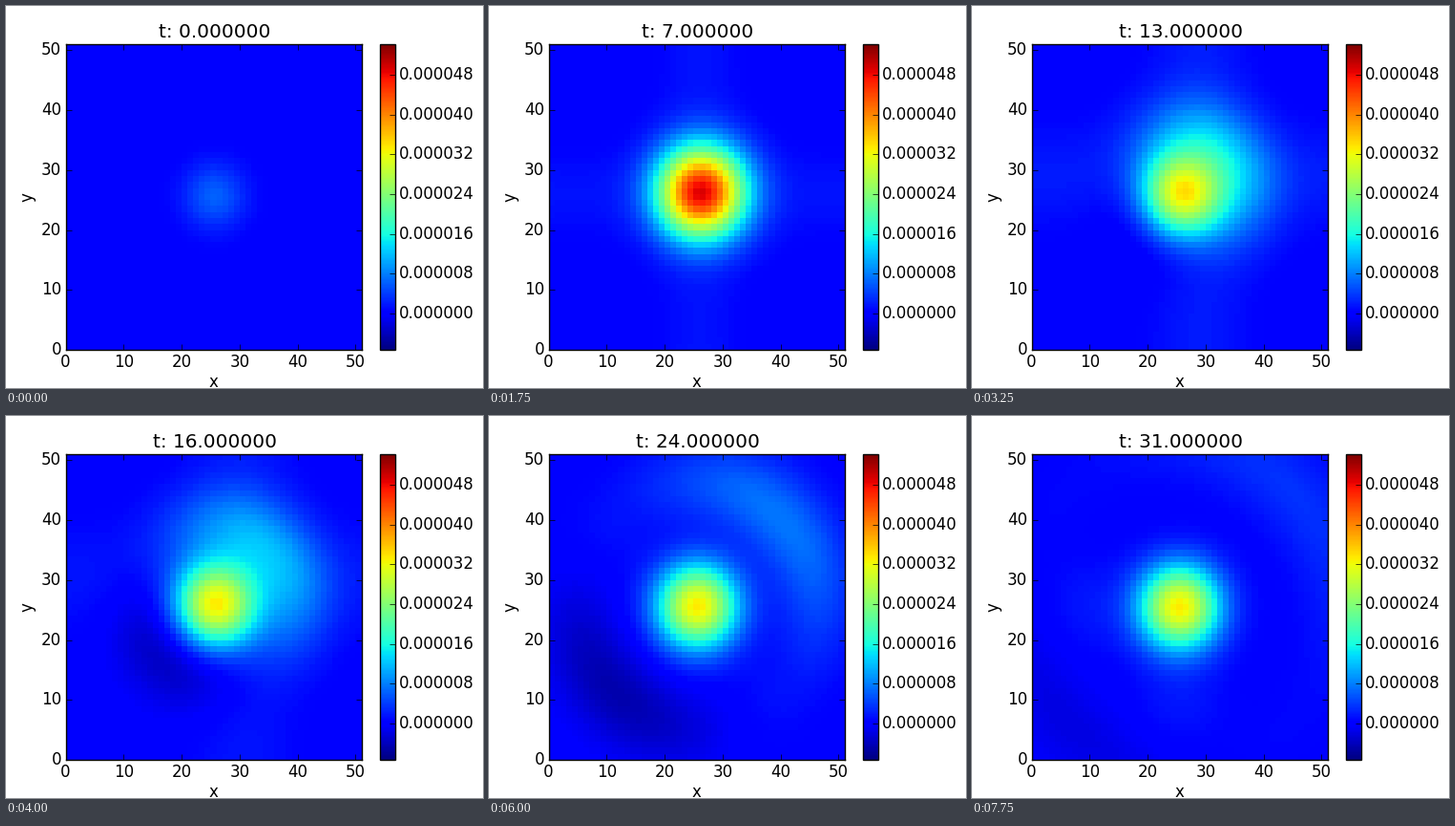
Write a matplotlib script that moves like this. It is 500 px wide and 400 px high and loops after 8 s.

```python
import numpy as np
import matplotlib.pyplot as plt
from matplotlib.animation import FuncAnimation

plt.style.use("classic")
plt.rcParams.update({
    "font.family": "DejaVu Sans",
    "xtick.major.pad": 3.2,
    "ytick.major.pad": 3.2,
})

CELLS = 51
STEPS = 32
VMIN, VMAX = -7.3e-6, 54.14e-6

axis = np.arange(CELLS) + 0.5 - CELLS / 2
X, Y = np.meshgrid(axis, axis)


def bell(d, width):
    return np.exp(-d**2 / (2 * width**2))


def spot(x, y, width):
    return bell(np.hypot(X - x, Y - y), width)


def core(t, rise):
    """Standing peak that builds up and leans along the diagonal for a while."""
    s = 0.5 * bell(t - 12, 8)
    return (6.2 + 27.1 * rise) * spot(s, s, 3.8 + 1.1 * rise)


def wave(t, rise):
    """Ring running outwards, raised to the upper right, lowered opposite."""
    s = bell(t - 13, 7)
    r = np.hypot(X - s, Y - s)
    lean = np.cos(np.arctan2(Y - s, X - s) - np.pi / 4)
    lean *= np.abs(lean) ** max(t / 16 - 1, 0)   # narrows as it travels

    front = np.logaddexp(0, t - 3.7)
    out, back = bell(r - front, 5), bell(r + front, 5)
    even = 12.7 * rise / (1 + (front / 6.5)**2)
    odd = 7.5 * bell(t - 18, 9)
    return even * (out + back) + odd * lean * (out - back)


def bands(t):
    """Faint cross that widens and drifts, then fades."""
    drift, width = 0.5 * max(t - 6, 0), 4 + 0.15 * t
    across = bell(Y - drift, width) * (1 - bell(X, 8))
    return 2 * bell(t - 12, 6) * (across + across.T)


def lobes(t):
    return 1.6 * np.clip((t - 23) / 8, 0, 1) * (spot(-16, 0, 5.5) + spot(0, -16, 5.5))


def field(t):
    rise = 1 - np.exp(-(t / 2.7)**2)
    return 1e-6 * (core(t, rise) + wave(t, rise) + bands(t) + lobes(t))


fig = plt.figure(figsize=(5, 4), dpi=100, facecolor="w")
ax = fig.add_axes([0.125, 0.1, 0.62, 0.8])
cax = fig.add_axes([0.78375, 0.1, 0.032, 0.8])

edges = np.arange(CELLS + 1)
mesh = ax.pcolormesh(edges, edges, field(0), cmap="jet", vmin=VMIN, vmax=VMAX)
ax.set(xlim=(0, CELLS), ylim=(0, CELLS),
       xticks=range(0, 51, 10), yticks=range(0, 51, 10))
ax.set_xlabel("x", labelpad=2)
ax.set_ylabel("y", labelpad=4)
title = ax.set_title("t: 0.000000", x=0.504)
fig.colorbar(mesh, cax=cax, ticks=np.arange(7) * 8e-6, format="%.6f")
cax.tick_params(direction="in")


def update(i):
    mesh.set_array(field(i))
    title.set_text(f"t: {i:.6f}")
    return mesh, title


anim = FuncAnimation(fig, update, frames=STEPS, interval=250,
                     repeat=True, repeat_delay=0, blit=False)
plt.show()
```
